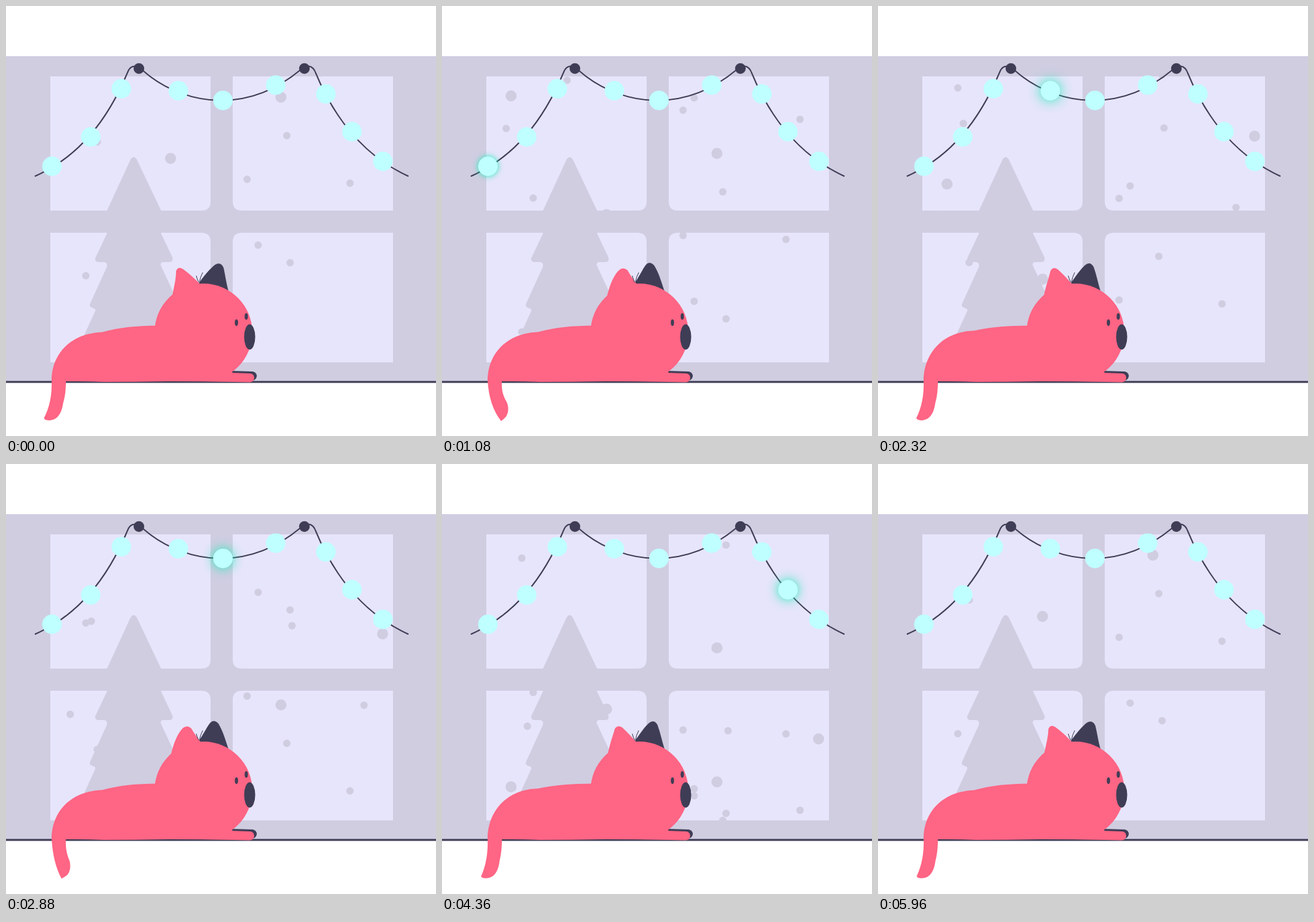
These frames come from a looping animation (660x660 px, 6 s). An HTML page:

```html
<!DOCTYPE html>
<html lang="en">
<head>
<meta charset="utf-8">
<title>Cat at a winter window</title>
<style>
  html, body { margin: 0; width: 100%; height: 100%; overflow: hidden; background: #fff; }
  svg { display: block; width: 100vw; height: 100vh; }
</style>
</head>
<body>
<svg viewBox="0 0 660 660">
  <defs>
    <clipPath id="wall"><rect y="77" width="660" height="500"/></clipPath>
    <filter id="blur" x="-150%" y="-150%" width="400%" height="400%" color-interpolation-filters="sRGB">
      <feGaussianBlur id="blurSize" stdDeviation="0"/>
    </filter>
  </defs>

  <g clip-path="url(#wall)" fill="#d0cde1">
    <rect y="77" width="660" height="500"/>
    <g fill="#e7e5fb">
      <path d="M68 108H314V300Q314 314 300 314H68Z"/>
      <path d="M348 108H594V314H362Q348 314 348 300Z"/>
      <path d="M68 348H300Q314 348 314 362V547H68Z"/>
      <path d="M362 348H594V547H348V362Q348 348 362 348Z"/>
    </g>
    <path d="M191 236Q196 228 201 236L238 314V349L255.500 386Q257 393 251 393H241Q236 394 238 399L290 510V560H95L137 468Q138 465 134 464Q127 462 129 457L155 400Q156 394 151 393H141Q136 392 137 387L155 349V314Z"/>
    <g id="snow"></g>
  </g>

  <path d="M0 577H660" stroke="#3f3d56" stroke-width="3"/>

  <g fill="none" stroke="#3f3d56" stroke-width="2" stroke-linecap="round">
    <path d="M45 261C110 232 155 178 187 101Q192 89 204 94L210 99C245 130 290 145 330 145S410 133 452 98L458 94Q470 89 475 102C505 175 550 230 617 261"/>
  </g>
  <g fill="#3f3d56"><circle cx="204" cy="96" r="8.200"/><circle cx="458" cy="96" r="8.200"/></g>
  <circle id="glow" r="15" fill="#1de9b6" filter="url(#blur)"/>
  <g id="bulbs" fill="#bfffff"></g>

  <path id="darkEar" fill="#3f3d56"/>
  <path d="M346 560L379 561Q385 563 385 568Q384 574 378 575L346 570Z" fill="#3f3d56"/>
  <g fill="#ff6584">
    <path id="tail"/>
    <path id="body"/>
    <path id="pinkEar"/>
    <circle cx="303" cy="501" r="75"/>
    <path d="M300 560L346 563L375 564Q381 565 381 571Q380 577.500 374 577.500L300 576Z"/>
  </g>
  <path d="M296 424Q293 419 292 414M297 424Q298 416 302 409" fill="none" stroke="#3f3d56"/>
  <g fill="#3f3d56">
    <ellipse cx="353.700" cy="486" rx="2.500" ry="5"/>
    <ellipse cx="368.800" cy="476.500" rx="2.500" ry="5"/>
    <ellipse cx="374" cy="508" rx="8.500" ry="19.500"/>
  </g>
</svg>

<script>
const LOOP = 6000, STEP = 40;
const $ = id => document.getElementById(id);

function add(parent, name, attrs) {
  const el = document.createElementNS('http://www.w3.org/2000/svg', name);
  for (const key in attrs) el.setAttribute(key, attrs[key]);
  return parent.appendChild(el);
}

// Flakes are x, y, radius; each group falls at its own steady speed.
const nearFlakes = [[422, 140, 8.5], [431, 199, 5.7], [370, 266, 5.7], [528, 272, 5.7],
  [387, 367, 5.7], [436, 394, 5.7], [122.5, 414, 5.7], [252.5, 234, 8.5], [140, 208.5, 5.7]];
const lateFlakes = [[131, 45, 5.7], [106, 138, 8.5], [192, 114, 5.7], [98.5, 188, 5.7],
  [439, 52, 5.7], [578, 64.5, 8.5], [387, 141, 5.7], [370, 160, 5.7], [549.5, 174, 5.7]];
const snow = [
  { flakes: nearFlakes, speed: 0.0798, zero: 0 },
  { flakes: lateFlakes, speed: 0.109, zero: 1080 },
  { flakes: nearFlakes, speed: 0.211, zero: 3686 },
  { flakes: nearFlakes, speed: 0.1685, zero: 5960 }
];
for (const group of snow) {
  group.el = add($('snow'), 'g', {});
  for (const [cx, cy, r] of group.flakes) add(group.el, 'circle', { cx, cy, r });
}

const bulbs = [[70.5, 246], [130, 201], [177, 127], [264.5, 130], [333, 145],
  [414, 121.5], [491, 135], [531, 193], [578.5, 238.5]];
for (const [cx, cy] of bulbs) add($('bulbs'), 'circle', { cx, cy, r: 15 });
const LIGHT_START = 820, LIGHT_SPAN = 500;

// Each part blends between two poses with matching commands.
const poses = {
  darkEar: [
    'M294 428C304 414 313 403 321 397Q330 392 334 402C337 415 338 426 342 439L310 445Z',
    'M294 428C303 415 307 405 311 399Q317 390 325 398C333 410 337 425 342 439L310 445Z'],
  pinkEar: [
    'M255 446C258 430 261 420 261 407Q264 399 272 404C282 411 290 419 298 427L285 445Z',
    'M253 446C258 425 265 411 273 405Q280 400 286 406C290 414 294 420 299 427L285 445Z'],
  tail: [
    'M70 573C71 597 66 616 56.500 632C56 634 60 637 67 636C80 635 85 622 87 610C91 598 92 588 92 573Z',
    'M70 573C71 600 79 622 91 637C92 637 95 634 98 631C103 625 103 614 99 607C93 597 91 588 92 573Z'],
  body: [
    'M70 577C69 540 93 503 148 500.500C175 493 200 491 232 490.500L320 500L347 562L360 576.500L250 576Q200 577 150 577Q120 575.500 92 576Z',
    'M70 577C69 540 93 499 148 497.500C175 492 200 491 232 490.500L320 500L347 562L360 576.500L250 576Q200 577 150 577Q120 575.500 92 576Z']
};

function pose(id, mix) {
  const [from, to] = poses[id];
  const ends = to.match(/[\d.]+/g);
  let i = 0;
  $(id).setAttribute('d', from.replace(/[\d.]+/g, n => (+n + (ends[i++] - n) * mix).toFixed(2)));
}

const wave = (t, period) => (1 - Math.cos(2 * Math.PI * t / period)) / 2;

function draw(t) {
  for (const { el, speed, zero } of snow)
    el.setAttribute('transform', `translate(0 ${(speed * (t - zero)).toFixed(2)})`);

  const light = (t - LIGHT_START) / LIGHT_SPAN;
  const index = Math.floor(light);
  const bulb = bulbs[index];
  $('glow').style.display = bulb ? '' : 'none';
  if (bulb) {
    $('glow').setAttribute('cx', bulb[0]);
    $('glow').setAttribute('cy', bulb[1]);
    $('blurSize').setAttribute('stdDeviation', (10 * (1 - light + index)).toFixed(2));
  }

  const ears = 1 - Math.abs(1 - t % 2000 / 1000);
  pose('darkEar', ears);
  pose('pinkEar', ears);
  pose('tail', wave(t - 150, 2000));
  pose('body', wave(t + 20, 1000));
}

function frame() {
  draw(Math.floor(performance.now() % LOOP / STEP) * STEP);
  requestAnimationFrame(frame);
}
frame();
</script>
</body>
</html>
```
